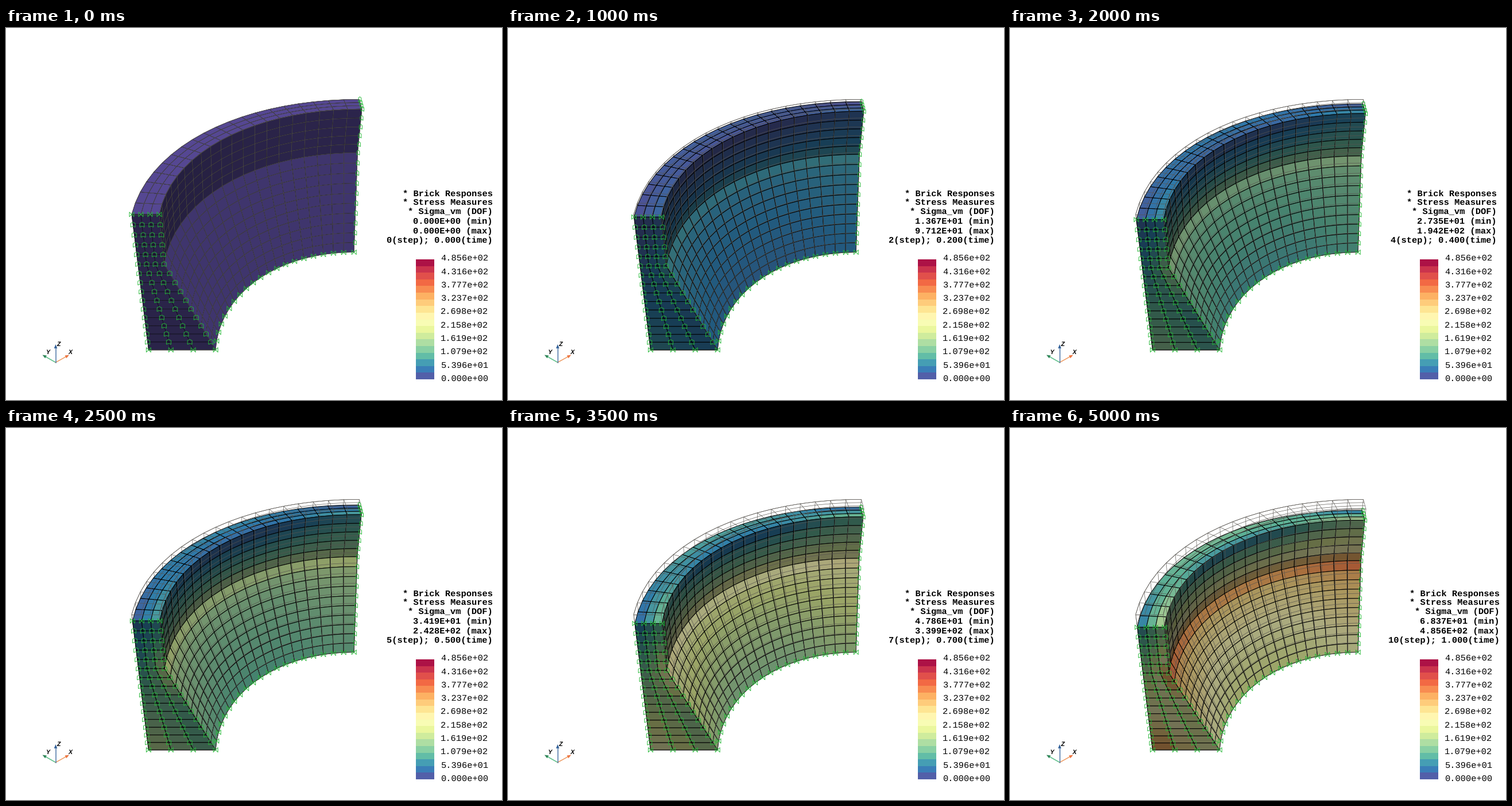
Write a matplotlib script that moves like this. It is 864 px wide and 648 px high and loops after 5500 ms.

```python
import numpy as np
import matplotlib
import matplotlib.pyplot as plt
from matplotlib.animation import FuncAnimation
from matplotlib.collections import LineCollection, PolyCollection

W, H = 864, 648
STEPS = 10
NPHI, NRAD, NROW, KINK = 20, 3, 15, 5
V_MIN, V_MAX = 68.372, 485.6

# Ring section and camera, in units of the distance to the top left edge
R_OUT, R_TOP, R_BOT, HEIGHT = 0.3742, 0.3345, 0.2622, 0.2775
AXIS = 0.198
FOCAL = H / 2 / np.tan(np.radians(15))
SIN, COS = np.sqrt(1 / 3), np.sqrt(2 / 3)

# Full-load displacement of the top: down, and outward at mid-arc
SINK, BULGE = 0.083, 0.006

cmap = matplotlib.colormaps["Spectral_r"]
plt.rcParams["text.hinting"] = "none"


def project(r, phi, drop):
    """Screen position of a ring point; drop runs from 0 (top) to 1 (bottom)."""
    a = AXIS - r * np.cos(phi)
    b = r * np.sin(phi)
    up = (b - AXIS) * SIN + (0.5 - drop) * HEIGHT * COS
    depth = 1 + b * COS + drop * HEIGHT * SIN
    x, y = np.broadcast_arrays(W / 2 + FOCAL * a / depth,
                               H / 2 - 0.5 - FOCAL * up / depth)
    return np.stack([x, y], axis=-1)


def nodes(i, j, k, load):
    """Nodes by circumferential, radial (0 = outer) and row (0 = top) index."""
    phi, t = np.radians(90) * i / NPHI, k / NROW
    slope = np.clip((k - KINK) / (NROW - KINK), 0, 1)
    inner = R_TOP + (R_BOT - R_TOP) * slope
    move = load * (1 - t) * (1 + 0.465 * t)
    r = R_OUT + (inner - R_OUT) * j / NRAD + BULGE * move * np.sin(2 * phi)
    return project(r, phi, t + SINK * move)


I, J, K = np.arange(NPHI + 1), np.arange(NRAD + 1), np.arange(NROW + 1)


def surfaces(load):
    top = nodes(I[None, :], J[:, None], 0, load)
    inner = nodes(I[None, :], NRAD, K[:, None], load)
    end = nodes(0, J[None, :], K[:, None], load)
    return top, inner, end


def quads(p):
    q = np.stack([p[:-1, :-1], p[:-1, 1:], p[1:, 1:], p[1:, :-1]], axis=2)
    return q.reshape(-1, 4, 2)


def grid_lines(p):
    return list(p) + list(p.swapaxes(0, 1))


def stress():
    """Full-load stress fraction and shading for every visible cell."""
    phi = np.radians(90) * (I[:-1] + 0.5) / NPHI
    e = np.cos(2 * phi) ** 4                        # 1 at the cut ends

    q = np.linspace(-1, 1, NRAD)[:, None]           # outer to inner
    top = 0.20 + 0.02 * e - 0.04 * q + 0.14 * q * e

    u = np.linspace(0, 1, KINK)[:, None]            # rim to kink
    wall = 0.14 + 0.38 * u + 0.10 * u ** 6 + e * (0.16 - 0.10 * u)

    s = (np.arange(NROW - KINK)[:, None] + 0.5) / (NROW - KINK)
    slope = 0.40 + 0.20 * (1 - s) + 0.18 * np.exp(-12 * s) + 0.07 * e

    x = (np.arange(NRAD) + 0.5) / NRAD
    t = np.linspace(0, 1, NROW)[:, None]
    bump = 0.48 * x ** 2 * np.exp(-((t - 0.36) / 0.2) ** 2)
    end = 0.13 + 0.17 * x + t * (0.61 - 0.49 * x) + bump

    parts = [(top, 0.90), (wall, 0.36 + 0.10 * np.sin(phi)),
             (slope, 0.67), (end, 0.45)]
    return (np.concatenate([v.ravel() for v, _ in parts]),
            np.concatenate([np.broadcast_to(m, v.shape).ravel()
                            for v, m in parts]))


VALUE, LIGHT = stress()

# Support symbols: an arch, a pair of facing triangles, a narrow side view
HOUSE = np.array([(-4, 4), (-4, -2.5), (0, -4.5), (4, -2.5), (4, 4),
                  (0, 2.5), (-4, 4)])
BOW = np.array([(0, 0), (-4, -4), (-4, 4), (0, 0), (4, -4), (4, 4), (0, 0)])
SIDE = HOUSE * (0.6, 1) + (1, 0)


def marks(load):
    def place(glyph, p):
        return [glyph + q for q in p.reshape(-1, 2)]

    top, inner, end = surfaces(load)
    return (place(BOW, end[0]) + place(HOUSE, end[1:-1])
            + place(BOW, end[-1]) + place(BOW, inner[-1, 1:])
            + place(SIDE, top[:, -1]) + place(SIDE, inner[1:-1, -1]))


fig = plt.figure(figsize=(W / 72, H / 72), dpi=72, facecolor="white")
ax = fig.add_axes([0, 0, 1, 1])
ax.set_xlim(0, W)
ax.set_ylim(H, 0)
ax.axis("off")


def wire(grids, z):
    lines = [line for g in grids for line in grid_lines(g)]
    ax.add_collection(LineCollection(lines, colors=[(0.34, 0.33, 0.31)],
                                     linewidths=0.65, zorder=z))


# Undeformed wireframe, behind and in front of the body
top0, inner0, end0 = surfaces(0)
wire([nodes(I[None, :], 0, K[:, None], 0), end0], 1)
wire([top0, inner0], 3)

body = PolyCollection([], edgecolors="black", zorder=2)
ax.add_collection(body)
bc = LineCollection([], colors="#22b834", linewidths=0.9, zorder=4)
ax.add_collection(bc)

# Colour bar
BANDS, BAR_TOP, BAR_H = 18, 403, 209
for n in range(BANDS):
    ax.add_patch(plt.Rectangle((714, BAR_TOP + n * BAR_H / BANDS), 32,
                               BAR_H / BANDS, lw=0, antialiased=False,
                               fc=cmap(1 - (n + 0.5) / BANDS)))


def label(x, y, s, size=15.4, family="Liberation Mono", **kw):
    return ax.text(x, y, s, fontsize=size, family=family, color="black",
                   va="baseline", **kw)


for n in range(10):
    label(757, 615 - n * 23.33, f"{V_MAX * n / 9:.3e}")

head = [label(848, 293 + 16.1 * n, "", ha="right", weight="bold")
        for n in range(6)]


# Axis triad
def arrow(tip, line, cone):
    o, tip = np.array([86.5, 582.5]), np.array(tip)
    u = (tip - o) / np.hypot(*(tip - o))
    n = np.array([-u[1], u[0]])
    base = tip - 7 * u
    ax.plot(*np.stack([o, base], axis=1), color=line, lw=1.5)
    ax.add_patch(plt.Polygon([tip, base + 2.8 * n, base - 2.8 * n],
                             fc=cone, lw=0))


arrow((63.5, 569.5), "#55bd84", "#2e8557")
arrow((110, 569.5), "#f09a60", "#ec7440")
arrow((86.5, 551), "#4a74a6", "#34629a")
for x, y, s in ((69, 568, "Y"), (108, 568, "X"), (88, 553.5, "Z")):
    label(x, y, s, 10.5, "Liberation Sans", weight="bold", style="italic")


def update(step):
    load = step / STEPS
    body.set_verts(np.concatenate([quads(p) for p in surfaces(load)]))
    body.set_facecolor(cmap(VALUE * load)[:, :3] * LIGHT[:, None])
    body.set_linewidth(1.0 if step else 0.5)
    bc.set_segments(marks(load))

    lines = ["* Brick Responses", "* Stress Measures", "* Sigma_vm (DOF)",
             f"{V_MIN * load:.3E} (min)", f"{V_MAX * load:.3E} (max)",
             f"{step}(step); {load:.3f}(time)"]
    # The block stays centred, so a longer last line moves its right edge
    right = 848 + 5 * (len(lines[-1]) - 20)
    for txt, s in zip(head, lines):
        txt.set_text(s)
        txt.set_x(right)
    return [body, bc, *head]


anim = FuncAnimation(fig, update, frames=STEPS + 1, interval=500, repeat=True,
                     repeat_delay=0, blit=False)
plt.show()
```
